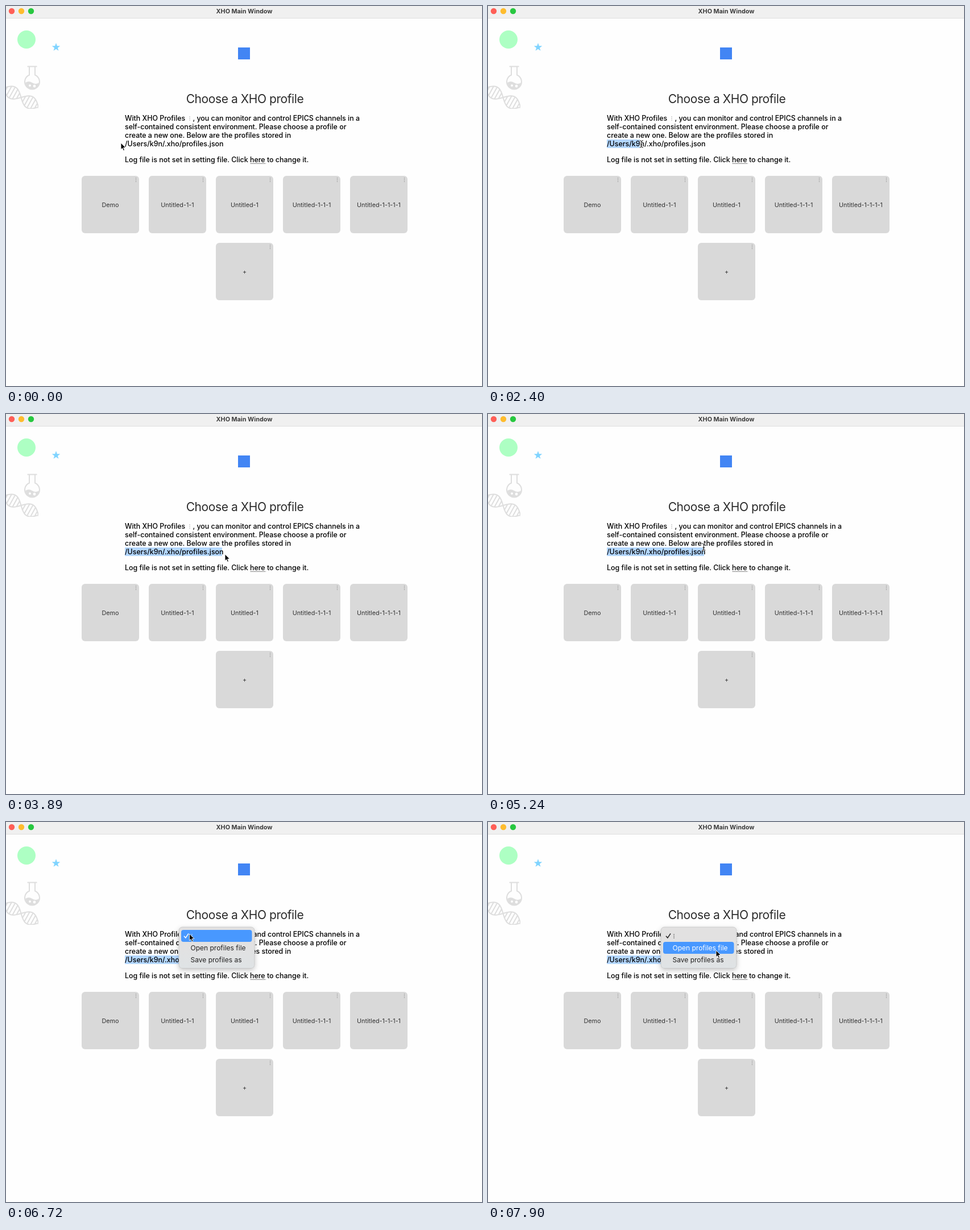
These frames come from a looping animation (837x669 px, 8 s). An HTML page:

```html
<!DOCTYPE html>
<html lang="en">
<head>
<meta charset="utf-8">
<title>Profile window</title>
<style>
  html, body { margin: 0; width: 100%; height: 100%; overflow: hidden; background: #fefefe; }
  svg { display: block; width: 837px; height: 669px; font-family: Inter, sans-serif; }
  .body { font-size: 12.42px; font-weight: 500; }
  .card { font-size: 10.8px; fill: #333; text-anchor: middle; }
  .menu { font-size: 12px; }
  .icon { fill: none; stroke: #dedede; stroke-width: 2; }
  h1, .heading { font-size: 21px; letter-spacing: -.02em; fill: #2b2b2b; text-anchor: middle; }
</style>
</head>
<body>
<svg viewBox="0 0 837 669">
  <defs>
    <filter id="shadow" x="-20%" y="-20%" width="140%" height="150%">
      <feDropShadow dx="0" dy="3" stdDeviation="4" flood-opacity=".22"/>
    </filter>
    <linearGradient id="glass" x2="0" y2="1">
      <stop offset=".4" stop-color="#e2e1e1"/><stop offset="1" stop-color="#dfe3e5"/>
    </linearGradient>
    <clipPath id="dnaClip"><path d="M0 138H57V181H0Z"/></clipPath>
    <path id="beamShape" d="M-3-6Q0-6 0-4Q0-6 3-6M0-4V4M-3 6Q0 6 0 4Q0 6 3 6M-1.7 1.5H1.7"/>
  </defs>

  <path d="M0 0H837V21H0Z" fill="#f0f0f0"/>
  <path d="M0 21.5H837" stroke="#dedede"/>
  <circle cx="10" cy="9" r="5.2" fill="#ff5f57"/>
  <circle cx="27" cy="9" r="5.2" fill="#febc2e"/>
  <circle cx="44" cy="9" r="5.2" fill="#28c840"/>
  <text x="419" y="12.8" font-size="10.8" font-weight="700" fill="#3c3c3c" text-anchor="middle">XHO Main Window</text>

  <circle cx="36" cy="59" r="16" fill="#adffc3"/>
  <path id="star" fill="#80d4ff"/>
  <g class="icon">
    <path d="M37.5 106.5H54.5M41 107V121.5A13 13 0 1 0 51 121.5V107"/>
    <path d="M34 135Q40 131 46 135T58 135A12 12 0 0 1 34 135Z" fill="#dedede" stroke="none"/>
    <g fill="#fefefe" stroke="none">
      <circle cx="42" cy="140" r="2"/><circle cx="50" cy="141" r="2.4"/>
    </g>
  </g>
  <g clip-path="url(#dnaClip)"><path id="dna" class="icon" transform="translate(26.5 161) rotate(29)"/></g>
  <path d="M408 73H429V94H408Z" fill="#4285f4"/>

  <text class="heading" x="420" y="171">Choose a XHO profile</text>
  <rect id="selection" x="209" y="235" height="15" fill="#b3d7ff"/>
  <g class="body">
    <text x="209" y="201.6">With XHO Profiles</text>
    <text x="328.5" y="201.6">, you can monitor and control EPICS channels in a</text>
    <text x="209" y="216.8">self-contained consistent environment. Please choose a profile or</text>
    <text x="209" y="232">create a new one. Below are the profiles stored in</text>
    <text x="209" y="247.2">/Users/k9n/.xho/profiles.json</text>
    <text x="209" y="275">Log file is not set in setting file. Click here to change it.</text>
  </g>
  <path d="M430 277.3H456.5" stroke="#000" stroke-dasharray="1 1"/>
  <g id="cards"></g>

  <g id="menu">
    <rect x="304" y="185" width="133" height="72.5" rx="6" fill="url(#glass)" stroke="#bdbdbd" stroke-width=".7" filter="url(#shadow)"/>
    <rect id="highlight" x="308" width="124.5" height="21" rx="4" fill="#4898ff"/>
    <g id="first">
      <path d="M313 200.8L315.8 204L321 196.3" fill="none" stroke="currentColor" stroke-width="1.5"/>
    </g>
    <g class="menu">
      <text id="open" x="324.5" y="226.2">Open profiles file</text>
      <text x="324.5" y="247.2" fill="#222">Save profiles as</text>
    </g>
  </g>

  <path id="arrow" d="M0 0V11.7L2.6 9.3L4.4 13.6L6.4 12.8L4.6 8.6L8.3 8.3Z" stroke="#fff" stroke-width=".9"/>
  <g id="beam" fill="none">
    <use href="#beamShape" stroke="#fff" stroke-width="2.2"/>
    <use href="#beamShape" stroke="#000"/>
  </g>
</svg>
<script>
const el = id => document.getElementById(id);
const show = (id, on) => el(id).setAttribute('visibility', on ? 'visible' : 'hidden');
const times = (n, fn) => Array.from({ length: n }, (_, i) => fn(i));

const dots = (x, y, color) => times(3, i =>
  `<rect x="${x - .6}" y="${y + 3 * i - 3.6}" width="1.2" height="1.2" fill="${color}"/>`).join('');

const card = (x, y, label) =>
  `<rect x="${x}" y="${y}" width="101" height="101" rx="6" fill="#d9d9d9"/>` +
  `<text class="card" x="${x + 50.5}" y="${y + 54.5}">${label}</text>` + dots(x + 95.5, y + 7, '#8c8c8c');

el('cards').innerHTML =
  ['Demo', 'Untitled-1-1', 'Untitled-1', 'Untitled-1-1-1', 'Untitled-1-1-1-1']
    .map((label, i) => card(133 + 118 * i, 299, label)).join('') +
  card(369, 417, '+') + dots(323, 198, '#999');
el('first').innerHTML += dots(327, 201, 'currentColor');

el('star').setAttribute('d', 'M' + times(10, i => {
  const r = i % 2 ? 3.1 : 7.6, a = i * Math.PI / 5;
  return [88 + r * Math.sin(a), 72.7 - r * Math.cos(a)];
}).join('L') + 'Z');

// Two crossing strands joined by rungs
const wave = x => 11 * Math.sin(x * Math.PI / 35);
const strand = side => 'M' + times(45, i => [2 * i - 44, side * wave(2 * i - 44)]).join('L');
const rungs = times(11, i => 6 * i - 30).map(x => `M${x} ${-wave(x)}V${wave(x)}`).join('');
el('dna').setAttribute('d', strand(1) + strand(-1) + rungs);

// Pointer moves: first step, last step, end point
const moves = [
  [1500, 1650, 209.5, 242.5],
  [2250, 3290, 373, 244],
  [3440, 4040, 386, 247],
  [4490, 4640, 392, 242],
  [5240, 6280, 326, 200],
  [6420, 6720, 322.5, 197],
  [7160, 7900, 401, 226],
];
const easeOut = u => 1 - (1 - u) ** 1.6;

// The pointer advances in steps of about 150 ms
function pointer(t) {
  let x = 202, y = 241;
  for (const [start, end, endX, endY] of moves) {
    if (t < start) break;
    const gaps = Math.round((end - start) / 150);
    const step = Math.floor((t - start) / (end - start) * gaps + .02) + 1;
    const u = easeOut(Math.min(1, step / (gaps + 1)));
    x += (endX - x) * u;
    y += (endY - y) * u;
  }
  return [x, y];
}

function draw(now) {
  const t = now % 8000;
  const [x, y] = pointer(t);
  const beam = t >= 1650 && t < 3590 || t >= 5240 && t < 6420;
  const second = y > 211;
  show('beam', beam);
  show('arrow', !beam);
  el(beam ? 'beam' : 'arrow').setAttribute('transform', `translate(${x} ${y})`);
  el('selection').setAttribute('width', t < 2250 ? 0 : t < 3440 ? x - 212 : 171);
  show('menu', t >= 6720);
  el('highlight').setAttribute('y', second ? 211 : 190);
  el('first').setAttribute('color', second ? '#222' : '#fff');
  el('open').setAttribute('fill', second ? '#fff' : '#222');
  requestAnimationFrame(draw);
}
requestAnimationFrame(draw);
</script>
</body>
</html>
```
